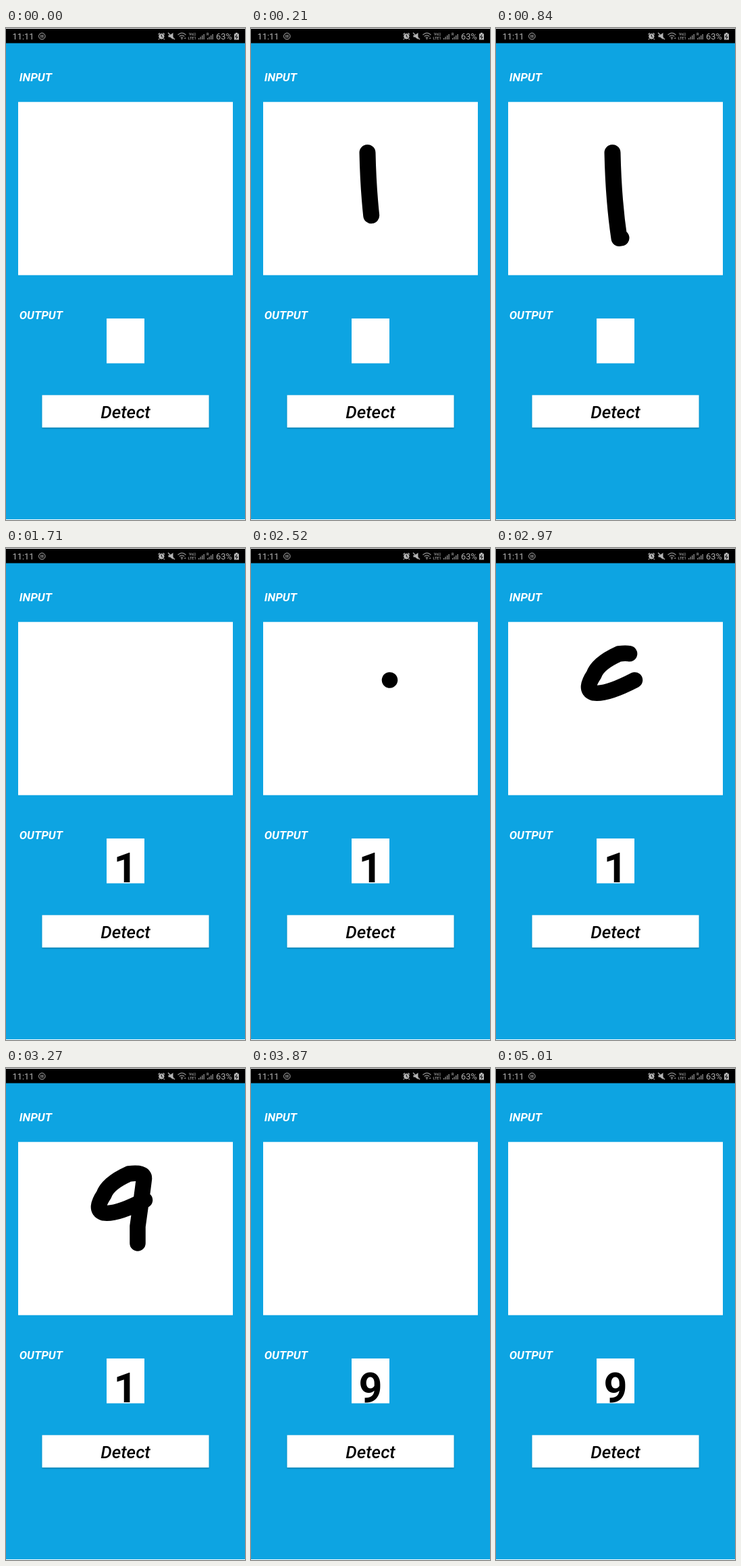
These frames come from a looping animation (354x730 px, 5130 ms). An HTML page:

```html
<!DOCTYPE html>
<html lang="en">
<head>
<meta charset="utf-8">
<title>Digit detection</title>
<style>
  html, body { margin: 0; width: 100%; height: 100%; overflow: hidden; background: #fff; }
  svg { display: block; width: 354px; height: 730px; font-family: Roboto, sans-serif; }
  .label { font: italic 700 17px Roboto, sans-serif; fill: #fff; }
  .detect { font: italic 500 26px Roboto, sans-serif; }
  .digit { font: 700 61px Roboto, sans-serif; }
  .status { fill: #b4b4b4; font-size: 12.8px; }
  .tiny { font-size: 5.5px; font-weight: 700; }
  .line { fill: none; stroke: #b4b4b4; stroke-width: 1.2; }
  .ink { fill: none; stroke: #000; stroke-linecap: round; stroke-linejoin: round; }
</style>
</head>
<body>
<svg viewBox="0 0 354 730">
  <defs>
    <filter id="shadow" x="-5%" y="-20%" width="110%" height="150%">
      <feDropShadow dx="0" dy="1.2" stdDeviation="1" flood-opacity=".3"/>
    </filter>
    <clipPath id="buttonClip"><rect x="53.5" y="545" width="247" height="48"/></clipPath>
    <clipPath id="outputClip"><rect x="149" y="431" width="56" height="66.5"/></clipPath>
    <path id="signal" d="M0 16h1.3v-2h-1.3zM2.5 16h1.3v-4h-1.3zM5 16h1.3v-6h-1.3zM7.5 16h1.3v-8h-1.3z"/>
  </defs>
  <rect y="1" width="354" height="728" fill="#0da4e2"/>
  <rect y="1" width="354" height="21.5" fill="#000"/>

  <g class="status">
    <text x="9.5" y="16.8">11:11</text>
    <circle class="line" cx="53.3" cy="12.2" r="4.7" style="stroke-width:1"/>
    <path class="line" d="M52 10v4.4M54.6 10v4.4"/>
    <circle cx="230.3" cy="12.4" r="4.2"/>
    <path class="line" d="M225.5 9.5l2.5-2M235 9.5l-2.5-2M227 16l-1.2 1.2M233.6 16l1.2 1.2"/>
    <path d="M230.3 10v2.6l2 1.2" fill="none" stroke="#000"/>
    <path d="M240.5 10.5h2.5l4.5-3.5v10l-4.5-3.5h-2.5z"/>
    <path class="line" d="M240 7l10 10"/>
    <g opacity=".8">
      <path class="line" d="M254.5 10.2q6-5.5 12 0M256.7 12.5q3.8-3.4 7.6 0M258.7 14.6q1.8-1.5 3.6 0"/>
      <circle cx="260.5" cy="16" r="1"/>
      <path d="M264 16l1.2-2.5 1.2 2.5z"/>
      <text class="tiny" x="271" y="11.2">Vo))</text>
      <text class="tiny" x="269.5" y="16.8">LTE1</text>
      <use href="#signal" x="285" y="1"/>
      <text class="tiny" x="297" y="10.5">R</text>
      <use href="#signal" x="298" y="1"/>
    </g>
    <text x="311" y="16.8">63%</text>
    <path d="M338 8.5h2v-1.5h3v1.5h2v9h-7z"/>
    <path d="M342 9.8l-2.3 3.5h3.4l-2.2 3" fill="none" stroke="#000"/>
  </g>

  <text class="label" x="19.7" y="78.5">INPUT</text>
  <rect x="18" y="109.7" width="318" height="257" fill="#fff"/>
  <path id="one" class="ink" stroke-width="24" d="M172.5 185Q174 255 182.5 312L185.5 311.5"/>
  <path id="nine" class="ink" stroke-width="23.5"
    d="M205.5 196Q163 218 145 215C133 212 137 200 145 188Q151 171 182 157Q205 154 204.500 164Q202 185 195 235V281"/>

  <text class="label" x="19.7" y="432">OUTPUT</text>
  <rect x="149" y="431" width="56" height="66.5" fill="#fff"/>
  <g clip-path="url(#outputClip)">
    <text id="digit" class="digit" x="177" y="495.5" text-anchor="middle"></text>
  </g>

  <rect x="53.5" y="544.7" width="247" height="48" fill="#fff" filter="url(#shadow)"/>
  <circle id="ripple" cx="177" cy="569" clip-path="url(#buttonClip)"/>
  <text class="detect" x="177" y="578.8" text-anchor="middle">Detect</text>
</svg>
<script>
const LOOP = 5130, STEP = 30;
const [one, nine, digit, ripple] = ['one', 'nine', 'digit', 'ripple'].map(id => document.getElementById(id));
const clamp = x => Math.max(0, Math.min(1, x));

// Reveal a stroke from its start, until it is cleared.
function drawStroke(path, t, start, duration, cleared) {
  const length = path.getTotalLength();
  path.style.display = t >= start && t < cleared ? '' : 'none';
  path.style.strokeDasharray = `${Math.max(.01, length * clamp((t - start) / duration))} 9999`;
}

function render(time) {
  const t = Math.floor(time % LOOP / STEP) * STEP;
  drawStroke(one, t, 60, 210, 930);
  drawStroke(nine, t, 2520, 810, 3750);
  digit.textContent = t < 930 ? '' : t < 3750 ? '1' : '9';

  const press = clamp((t - (t < 2000 ? 840 : 3660)) / 180);
  ripple.setAttribute('r', 130 * press);
  ripple.setAttribute('opacity', .12 * Math.min(1, 2 - 2 * press));
}

const begin = performance.now();
function tick() {
  render(performance.now() - begin);
  requestAnimationFrame(tick);
}
tick();
</script>
</body>
</html>
```
